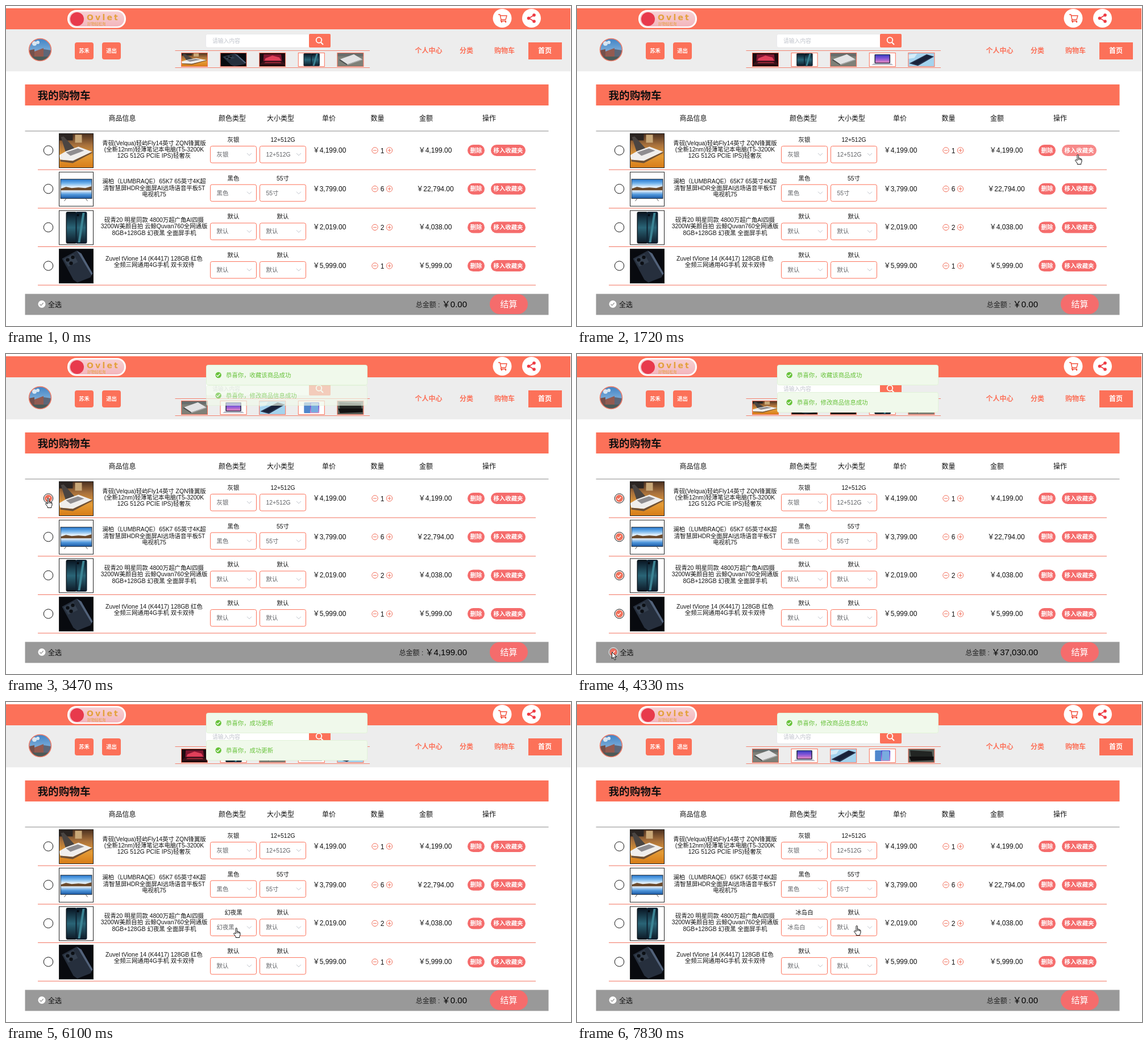
Write an HTML page that moves like this. It is 994 px wide and 563 px high and loops after 8 s.

```html
<!DOCTYPE html>
<html lang="zh-CN">
<head>
<meta charset="utf-8">
<title>购物车</title>
<style>
  html, body { margin: 0; width: 100%; height: 100%; overflow: hidden; background: #fff; }
  svg { display: block; }
  text { font-family: "Liberation Sans", "Noto Sans CJK SC", "Noto Sans CJK", sans-serif; white-space: pre; }
</style>
</head>
<body>
<svg id="stage" width="994" height="563" viewBox="0 0 994 563"></svg>
<script>
const ORANGE = '#fc7159', DANGER = '#f56c6c', GREEN = '#67c23a', GREY = '#606266', PALE = '#c0c4cc';
const ROW = 67.7;

// Drawing helpers, each returning SVG markup
const rect = (x, y, w, h, fill, rx = 0, more = '') =>
  `<rect x="${x}" y="${y}" width="${w}" height="${h}" fill="${fill}" rx="${rx}" ${more}/>`;
const circle = (x, y, r, fill, stroke = 'none', width = 1) =>
  `<circle cx="${x}" cy="${y}" r="${r}" fill="${fill}" stroke="${stroke}" stroke-width="${width}"/>`;
const path = (d, stroke, width = 1, fill = 'none') =>
  `<path d="${d}" fill="${fill}" stroke="${stroke}" stroke-width="${width}" stroke-linejoin="round"/>`;
const poly = (points, fill) => `<polygon points="${points}" fill="${fill}"/>`;
const text = (x, y, str, size = 12, fill = '#111', anchor = 'middle', weight = 400, more = '') =>
  `<text x="${x}" y="${y}" font-size="${size}" fill="${fill}" text-anchor="${anchor}" font-weight="${weight}" ${more}>${str}</text>`;
const at = (x, y, body, opacity = 1) =>
  `<g transform="translate(${x} ${y})" opacity="${opacity}">${body}</g>`;
const gradient = (id, ...colors) => `<linearGradient id="${id}" x2="0" y2="1">` +
  colors.map((c, i) => `<stop offset="${i / (colors.length - 1)}" stop-color="${c}"/>`).join('') + '</linearGradient>';
const tick = (x, y, color) => path(`M${x - 3} ${y}l2.2 2.4 4-4.6`, color, 1.3);

const defs = '<defs>' +
  gradient('wood', '#4a3020', '#a8713c', '#e39a35', '#d87d18') +
  gradient('lake', '#2a78cc', '#6fb2ec', '#e4f0fa', '#e4f0fa', '#4f97dc', '#1d5ba6') +
  gradient('teal', '#0b1a28', '#2a6577', '#10202e') +
  gradient('violet', '#3a3fc4', '#8a58d8', '#e88ac0') +
  gradient('sky', '#3f83c6', '#a9cbe6') +
  gradient('pink', '#f7d0d2', '#f3b6bd') +
  '<clipPath id="face"><circle cx="60" cy="77" r="19.5"/></clipPath></defs>';

// Product pictures on a 60 by 60 field
const back = fill => rect(0, 0, 60, 60, fill);
const pictures = {
  desk: back('url(#wood)') + rect(0, 0, 24, 12, '#2b2522') + rect(28, 2, 12, 14, '#c9a878') +
    poly('3,6 8,5 27,26 12,34', '#4a4542') + poly('0,38 12,31 34,23 58,32 24,48 2,46', '#f0eeec') +
    poly('12,33 33,26 44,30 20,39', '#8f8d90') + poly('2,46 24,48 58,32 58,34 24,52 2,49', '#6d5138'),
  slate: back('#080a0f') + poly('5,17 31,3 39,8 59,43 55,50 32,59 25,54', '#262f3d') +
    poly('31,3 39,8 59,43 57,46 35,9', '#52627a') + poly('8,18 25,9 33,23 16,31', '#35404f') +
    circle(15, 19, 3.2, '#0b0e13') + circle(24, 14.5, 3.2, '#0b0e13') + circle(21, 25, 3.2, '#0b0e13'),
  crimson: back('#1c0b10') + poly('10,6 50,6 52,36 9,36', '#7e1730') + poly('14,24 30,12 46,20 50,34 12,34', '#e0405a') +
    poly('8,38 54,38 60,52 1,52', '#3a1219') + poly('14,40 48,40 51,45 11,45', '#a02a3a'),
  jade: back('#fff') + rect(12, 2, 19, 56, '#0c1820', 3) + rect(13.5, 5, 16, 50, 'url(#teal)', 2) +
    rect(29, 2, 20, 56, '#0d2030', 3) + rect(31, 4, 16, 52, 'url(#teal)', 2) +
    poly('41,4 45,4 37,56 33,56', '#3c8494') + circle(33, 8, 2, '#050a10'),
  silver: back('#7e8078') + rect(0, 0, 60, 15, '#686d6c') + poly('6,28 38,6 57,28 23,50', '#e3e3e4') +
    poly('6,28 23,50 22,54 4,32', '#4d4f50') + poly('23,50 57,28 58,31 23,54', '#aaa'),
  violet: back('#fff') + rect(12, 6, 36, 40, '#252a48', 2) + rect(14, 9, 32, 34, 'url(#violet)') +
    poly('10,47 50,47 55,53 5,53', '#aeb2c0'),
  tablet: back('#a4d3ee') + poly('2,46 42,6 59,16 22,57', '#28344f') + poly('8,45 43,9 55,16 21,51', '#18223a') +
    poly('0,8 20,4 14,22 0,26', '#d6edf8'),
  pearl: back('#fff') + rect(13, 6, 18, 48, '#4f86cc', 3) + rect(27, 6, 21, 48, 'url(#violet)', 3) +
    rect(29, 9, 17, 42, '#79abdf', 2),
  coal: back('#59605a') + poly('4,6 54,12 56,36 6,34', '#222523') + poly('2,34 58,34 58,50 6,54', '#111'),
  tv: back('#fff') + rect(2, 12, 56, 35, '#202830') + rect(3, 13, 54, 33, 'url(#lake)') +
    poly('3,29 12,26 22,28 34,27 46,28 57,25 57,32 3,32', '#6b4a2c') + path('M12 47l-3 4M47 47l3 4', '#555')
};
const picture = (name, x, y, w, h, border) =>
  `<svg x="${x}" y="${y}" width="${w}" height="${h}" viewBox="0 0 60 60" preserveAspectRatio="none">${pictures[name]}</svg>` +
  rect(x, y, w, h, 'none', 0, `stroke="${border}"`);

const carousel = ['desk', 'slate', 'crimson', 'jade', 'silver', 'violet', 'tablet', 'pearl', 'coal'];
const products = [
  { image: 'desk', color: '灰银', size: '12+512G', price: '4,199.00', count: 1, sum: '4,199.00',
    lines: ['青砚(Velqua)轻屿Fly14英寸 ZQN锋翼版', '(全新12nm)轻薄笔记本电脑(T5-3200K', '12G 512G PCIE IPS)轻奢灰'] },
  { image: 'tv', color: '黑色', size: '55寸', price: '3,799.00', count: 6, sum: '22,794.00',
    lines: ['澜柏（LUMBRAQE）65K7 65英寸4K超', '清智慧屏HDR全面屏AI远场语音平板5T', '电视机75'] },
  { image: 'jade', color: '默认', size: '默认', price: '2,019.00', count: 2, sum: '4,038.00',
    lines: ['砚青20 明星同款 4800万超广角AI四摄', '3200W美颜自拍 云鲸Quvan760全网通版', '8GB+128GB 幻夜黑 全面屏手机'] },
  { image: 'slate', color: '默认', size: '默认', price: '5,999.00', count: 1, sum: '5,999.00',
    lines: ['Zuvel tVione 14 (K4417) 128GB 红色', '全频三网通用4G手机 双卡双待'] }
];

const SAVED = '收藏该商品成功', EDITED = '修改商品信息成功', UPDATED = '成功更新';
// toasts: [message, top, opacity]; pointer: [shape, x, y]
const scenes = [
  { start: 0 },
  { start: 860, pointer: ['arrow', 878, 264] },
  { start: 1720, pointer: ['hand', 876, 261], lit: true },
  { start: 2600, pointer: ['arrow', 120, 295], lit: true, toasts: [[SAVED, 19]] },
  { start: 3470, pointer: ['hand', 69, 253], checked: 1, total: '4,199.00', toasts: [[SAVED, 19], [EDITED, 55, .67]] },
  { start: 4330, pointer: ['arrow', 61, 524], checked: 4, total: '37,030.00', toasts: [[SAVED, 19], [EDITED, 67]] },
  { start: 5240, pointer: ['hand', 371, 388],
    toasts: [[SAVED, -6, .15], [EDITED, 33.5], [UPDATED, 81.5], [UPDATED, 122, .86]] },
  { start: 6100, pointer: ['hand', 400, 397], color: '幻夜黑', toasts: [[UPDATED, 19], [UPDATED, 67]] },
  { start: 7040, pointer: ['hand', 392, 487], color: '幻夜黑', menu: ['默认', '幻夜黑', '冰岛白', '幻影蓝'] },
  { start: 7830, pointer: ['hand', 487, 393], color: '冰岛白', toasts: [[EDITED, 19]] }
];

const pointers = {
  arrow: path('M.5 .5V12l2.7-2.5 2 4.8 2-.9-2-4.6H9z', '#111', 1, '#fff'),
  hand: path('M4 10V1.8Q4 .6 5.2 .6T6.4 1.8V6.5Q8.6 5.8 8.7 7.4 10.4 6.6 10.6 8.2 12 7.8 12 9.4V13L10.8 15.5V17.5H4.2V15.8L.8 11.2Q.3 9.6 1.6 9.4 2.8 9.6 4 11zM6.4 6.5V10M8.7 7.4V10M10.6 8.2V10.3',
    '#111', 1, '#fff')
};

function header() {
  const link = (x, label, fill = ORANGE) => text(x, 82.5, label, 12, fill, 'middle', 700);
  const button = (x, label) => rect(x, 64, 33, 30, ORANGE, 4) + text(x + 16.5, 82, label, 9.3, '#fff', 'middle', 700);
  return rect(0, 4, 993, 37, ORANGE) + rect(0, 41, 993, 74, '#ededed') +
    rect(108, 7, 103, 31.5, '#fff', 15.5) + rect(111, 9.5, 97, 26.5, 'url(#pink)', 13) +
    circle(125, 23, 12, '#e83a4c') +
    text(142, 25, 'Ovlet', 14, '#e3a13c', 'start', 700, 'letter-spacing="3.2" style="font-family:\'DejaVu Sans\',sans-serif"') +
    text(143, 33.5, '好物轻松淘', 6.5, '#e3a13c', 'start') +
    circle(873, 21.5, 16.5, '#fff') + circle(924.5, 21.5, 16.5, '#fff') +
    path('M866 15h3l2 9h8l2-7h-11M871 24l-.5 2.5h9.5', '#f2513d', 1.4) +
    circle(872, 28, 1.3, '#f2513d') + circle(879, 28, 1.3, '#f2513d') +
    path('M929 16l-9 5.5 9 5.5', '#ee3a43', 1.5) +
    [[929, 16], [919.5, 21.5], [929, 27]].map(([x, y]) => circle(x, y, 2.8, '#ee3a43')).join('') +
    `<g clip-path="url(#face)">${rect(40, 57, 40, 40, 'url(#sky)')}${circle(50, 66, 4, '#d7e6f2')}${circle(56, 64, 3, '#d7e6f2')}` +
    poly('40,78 50,76 50,98 40,98', '#74504c') + poly('50,80 66,74 66,98 50,98', '#935a50') +
    poly('66,76 80,78 80,98 66,98', '#5d6678') + rect(40, 89, 40, 9, '#4c5a58') + '</g>' +
    circle(60, 77, 19.5, 'none', '#f07c66', 1.5) + button(121, '苏禾') + button(169, '退出') +
    rect(351.5, 49.5, 183, 23.5, '#fff', 3, 'stroke="#e2e4e8" stroke-width=".7"') + text(363, 64.5, '请输入内容', 9.8, PALE, 'start') +
    rect(533, 49, 38, 24, ORANGE, 2) + circle(550.5, 60, 4.8, 'none', '#fff', 1.8) + path('M554 64l4 4', '#fff', 2) +
    link(743.5, '个人中心') + link(810, '分类') + link(877, '购物车') +
    rect(919, 64, 59, 30, ORANGE) + link(948, '首页', '#fff');
}

function thumbnails(shift) {
  return path('M297.5 78.5H640M297.5 108.5H640', '#f3826f') +
    carousel.slice(shift, shift + 5).map((name, i) => picture(name, 308.5 + 68.6 * i, 82.5, 46, 24, ORANGE)).join('');
}

function select(x, label, value) {
  return text(x + 41, 19, label, 10.4) + rect(x + .5, 26.5, 81, 29.5, '#fff', 3, `stroke="${ORANGE}"`) +
    text(x + 11.5, 45, value, 10.4, GREY, 'start') + path(`M${x + 65} 39l4 4 4-4`, PALE);
}

function pill(x, w, label, fill) {
  return rect(x, 24, w, 20, fill, 10) + text(x + w / 2, 37.8, label, 10.4, '#fff', 'middle', 700);
}

function productRow(item, i, scene) {
  const color = i === 2 && scene.color || item.color;
  const step = (x, sign) => circle(x, 34, 5.2, 'none', '#f2705c') + path(`M${x - 3} 34h6` + sign, '#f2705c');
  return at(0, 220 + ROW * i,
    circle(74.5, 34, 8.2, '#fff', '#111') +
    (i < (scene.checked || 0) ? circle(74.5, 34, 6.5, '#f0705a') + tick(74, 34, '#fff') : '') +
    picture(item.image, 93.5, 4.5, 60, 60, '#222') +
    item.lines.map((line, n) => text(260.5, 24.7 + 11.3 * n, line, 10.4)).join('') +
    select(359, color, color) + select(446, item.size, item.size) +
    text(569, 38, '￥' + item.price) + step(649, '') + text(662, 38.5, item.count) + step(674.5, 'm-3-3v6') +
    text(755, 38, '￥' + item.sum) +
    pill(812, 30, '删除', DANGER) + pill(853, 61, '移入收藏夹', i === 0 && scene.lit ? '#f78989' : DANGER) +
    path('M56 68H932', '#f2705c'));
}

function cart(scene) {
  const heads = [[204.5, '商品信息'], [398, '颜色类型'], [483, '大小类型'], [568, '单价'], [653.5, '数量'], [739, '金额'], [850, '操作']];
  return rect(33.5, 138, 921, 37, ORANGE) + text(55.5, 163.5, '我的购物车', 18.6, '#111', 'start', 700) +
    heads.map(([x, label]) => text(x, 201.5, label)).join('') + path('M33.5 220H954.5', '#888') +
    products.map((item, i) => productRow(item, i, scene)).join('');
}

function footer({ checked, total = '0.00' }) {
  const all = checked === 4;
  return rect(33.5, 506.5, 921, 37, '#999') +
    (all ? circle(64, 524.5, 8, '#999', '#eee') + circle(64, 524.5, 6.4, '#ee6f60') + tick(63.5, 524.5, '#fff')
         : circle(63, 524.5, 6.5, '#fff') + tick(62.5, 524.5, '#999')) +
    text(all ? 75.5 : 74, 530, '全选', 12, '#111', 'start') +
    text(811, 530, `总金额 : <tspan font-size="15" fill="#000">￥${total}</tspan>`, 12, '#222', 'end') +
    rect(851, 507, 67, 35, DANGER, 17.5) + text(884.5, 530, '结算', 15, '#fff', 'middle', 500);
}

function toast([message, top, opacity]) {
  return at(352, top, rect(.5, .5, 283, 35, '#f0f9eb', 3, 'stroke="#e1f3d8"') +
    circle(21.7, 18, 5.2, GREEN) + tick(21.3, 18, '#fff') +
    text(35, 21.8, '恭喜你，' + message, 10.4, GREEN, 'start'), opacity);
}

function dropdown(options, value) {
  return at(359, 421, rect(.5, .5, 81, 111, '#fff', 3, 'stroke="#e4e7ed"') +
    path('M22 .8l5-5 5 5', '#e4e7ed', 1, '#fff') + rect(1, 55.6, 80, 25.3, '#f5f7fa') +
    options.map((name, i) => text(15, 21 + 25.3 * i, name, 10.4, name === value ? '#409eff' : GREY, 'start', name === value ? 700 : 400)).join(''));
}

function render(index) {
  const scene = scenes[index], { toasts = [], menu, pointer } = scene;
  stage.innerHTML = defs + header() + thumbnails(index % 5) + cart(scene) + footer(scene) +
    (menu ? dropdown(menu, scene.color) : '') + toasts.map(toast).join('') +
    (pointer ? at(pointer[1], pointer[2], pointers[pointer[0]]) : '');
}

const stage = document.getElementById('stage');
let shown = -1;
function play() {
  const time = performance.now() % 8000;
  const index = scenes.filter(scene => scene.start <= time).length - 1;
  if (index !== shown) render(shown = index);
  requestAnimationFrame(play);
}
play();
</script>
</body>
</html>
```
